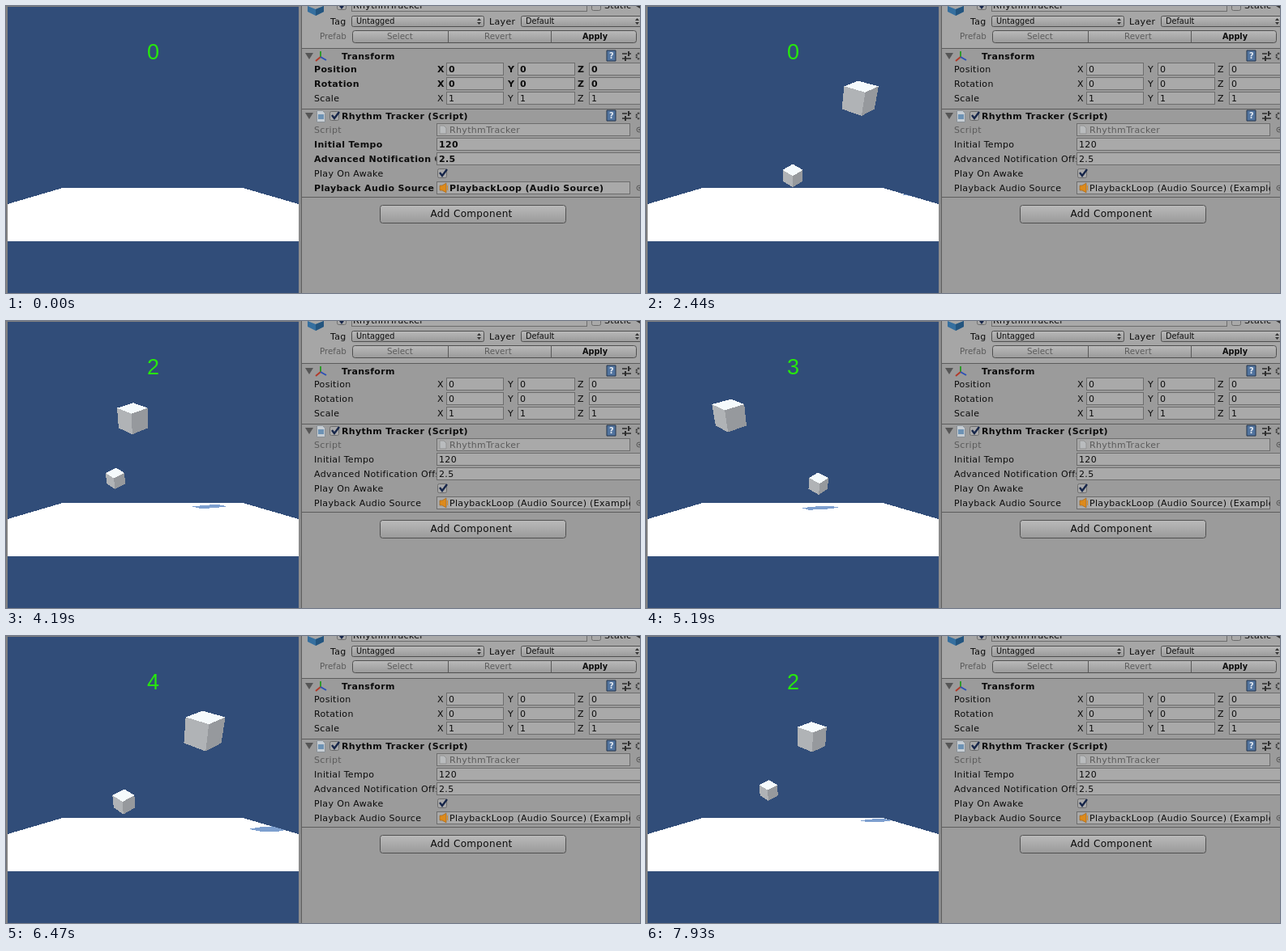
An HTML page that plays this animation: 782 px wide and 355 px high, repeating every 8 s.

```html
<!DOCTYPE html>
<html lang="en">
<head>
<meta charset="utf-8">
<title>Rhythm Tracker</title>
<style>
html, body { margin: 0; width: 100%; height: 100%; overflow: hidden; background: #9b9b9b; }
svg { display: block; width: 782px; height: 355px; }
text { font: 11px "DejaVu Sans", sans-serif; letter-spacing: .34px; fill: #0c0c0c; white-space: pre; }
text.b, .edit text.v { font-weight: bold; }
text.s { font-size: 9.7px; letter-spacing: 0; }
text.m { font-size: 10.3px; letter-spacing: 0; }
text.l { font-size: 12px; }
text.dim { fill: #5b5b5b; }
#count { font: 27px "Liberation Sans", Arial, sans-serif; letter-spacing: 0; fill: #27e80c; text-anchor: middle; }
.edit .play, .run .rest { display: none; }
.crisp { shape-rendering: crispEdges; }
.field { fill: #a9a9a9; stroke: #6d6d6d; }
.btn { fill: url(#btn); stroke: #505050; }
</style>
</head>
<body>
<svg id="stage" class="edit" viewBox="0 0 782 355">
  <defs>
    <linearGradient id="btn" x2="0" y2="1">
      <stop offset="0" stop-color="#bababa"/><stop offset="1" stop-color="#9a9a9a"/>
    </linearGradient>
    <clipPath id="view"><rect x="2" y="1" width="359" height="354"/></clipPath>
    <clipPath id="floor"><path d="M2 245L70 225H292L361 245V291H2Z"/></clipPath>
  </defs>
  <rect width="782" height="355" fill="#9b9b9b"/>
  <rect x="365" width="417" height="52" fill="#a6a6a6"/>
  <rect width="365" height="355" fill="#808080"/>
  <rect x="361" width="4" height="355" fill="#8c8c8c"/>
  <path d="M364.5 0V355" stroke="#5e5e5e"/>
  <rect x="2" y="1" width="359" height="354" fill="#314d79"/>
  <path class="crisp" d="M2 245L70 225H292L361 245V291H2Z" fill="#fff"/>
  <g id="shade" class="crisp" clip-path="url(#floor)" fill="#7d9fcf"></g>
  <g id="cubes" class="crisp" clip-path="url(#view)"></g>
  <text id="count" x="181.5" y="66">0</text>
  <g id="panel"></g>
</svg>
<script>
const $ = id => document.getElementById(id);

// ---- Inspector ----
const parts = [];
const add = s => parts.push(s);
const text = (x, y, s, cls = '') => add(`<text x="${x}" y="${y}" class="${cls}">${s}</text>`);
const box = (x, y, w, h, cls = 'field', r = 0) =>
  add(`<rect x="${x + .5}" y="${y + .5}" width="${w}" height="${h}" rx="${r}" class="${cls}"/>`);
const path = (d, fill = 'none', stroke = 'none', w = 1) =>
  add(`<path d="${d}" fill="${fill}" stroke="${stroke}" stroke-width="${w}"/>`);
const rule = y => path(`M365 ${y + .5}H782`, 'none', '#5c5c5c');
const sorter = (x, y) => path(`M${x} ${y - 1}l2.5 -3 2.5 3zM${x} ${y + 1}l2.5 3 2.5 -3z`, '#333');

function check(x, y) {
  box(x, y, 11, 11, 'field', 2);
  path(`M${x + 3} ${y + 5}l3 4 6 -8`, 'none', '#17264a', 2.4);
}

function gear(x, y) {
  add(`<circle cx="${x}" cy="${y}" r="3.5" fill="none" stroke="#333" stroke-width="2" stroke-dasharray="1.8 1"/>`);
}

function header(y, title) {
  path(`M369 ${y - 4}h10l-5 8z`, '#565656');
  text(414, y + 4, title, 'b');
  path(`M741 ${y - 7}h11v13h-11z`, '#52749f', '#22354f');
  add(`<text x="744" y="${y + 3}" class="s b" style="fill:#e4e9f0">?</text>`);
  path(`M760 ${y - 3}h6M768 ${y - 3}h3M760 ${y + 3}h3M765 ${y + 3}h6`, 'none', '#2e2e2e', 1.5);
  path(`M768 ${y - 6}v6M764 ${y}v6`, 'none', '#2e2e2e', 2);
  gear(781, y);
}

// object header
path('M372 0L382 4 392 0V7L382 12 372 7Z', '#356f9f');
path('M382 4L392 0V7L382 12Z', '#24557f');
check(408, -7);
box(426, -9, 290, 15);
text(428, 3, 'RhythmTracker');
box(722, -6, 11, 11, 'field', 2);
text(738, 3, 'Static');
path('M777 0h5v3z', '#333');
text(400, 23, 'Tag');
box(426, 12, 163, 13, 'btn', 2);
text(432, 22, 'Untagged', 's');
sorter(581, 19);
text(596, 23, 'Layer');
box(635, 12, 160, 13, 'btn', 2);
text(641, 22, 'Default', 's');
sorter(776, 19);
text(387, 41, 'Prefab', 'm dim');
box(427, 30, 350, 15, 'btn', 3);
path('M545.5 30V46M672.5 30V46', 'none', '#595959');
text(470, 41, 'Select', 'm dim');
text(590, 41, 'Revert', 'm dim');
text(711, 41, 'Apply', 's b');
rule(52);

// transform
header(62, 'Transform');
path('M388 63V56', 'none', '#2f9a2b', 2);
path('M388 63L382 68', 'none', '#b23a2a', 2);
path('M388 63L395 67', 'none', '#2c50b5', 2);
[['Position', 0, 'v'], ['Rotation', 0, 'v'], ['Scale', 1, '']].forEach(([name, val, cls], i) => {
  const y = 82 + 18 * i;
  text(380, y, name, cls);
  [['X', 532, 543], ['Y', 619, 631], ['Z', 705, 719]].forEach(([axis, x, fx]) => {
    text(x, y, axis, cls);
    box(fx, y - 12, 70, 15);
    text(fx + 3, y, val, cls);
  });
});
rule(127);

// script
header(136, 'Rhythm Tracker (Script)');
path('M383.5 129.5h7l3 3v11h-10z', '#c6cdd3', '#8a9096');
path('M385 134h7v6h-7z', '#6d92b4');
check(399, 130);
text(380, 157, 'Script', 'dim');
box(531, 145, 238, 15);
path('M535 148h5l3 3v7h-8z', '#b9bcbe', '#939393');
text(547, 157, 'RhythmTracker', 'dim');
[['Initial Tempo', '120', 175], ['Advanced Notification Offset', '2.5', 193]].forEach(([name, val, y]) => {
  text(380, y, name, 'v');
  path(`M530.5 ${y - 14}H782V${y + 5}H530.5Z`, '#9b9b9b');
  box(531, y - 12, 260, 15);
  text(534, y, val, 'v');
});
text(380, 211, 'Play On Awake');
check(532, 201);
text(380, 229, 'Playback Audio Source', 'v');
box(531, 217, 238, 15);
path('M535 222h3l5 -3v12l-5 -3h-3z', '#dd8a1c', '#99601a', .6);
path('M544.5 222v6', 'none', '#dd8a1c');
text(547, 229, 'PlaybackLoop (Audio Source)', 'v rest');
text(547, 229, 'PlaybackLoop (Audio Source) (Example)', 'play');
path('M770 216H782V234H770Z', '#9b9b9b');
for (const y of [153, 225]) {
  add(`<circle cx="781" cy="${y}" r="3" fill="none" stroke="#555"/><circle cx="781" cy="${y}" r="1" fill="#555"/>`);
}
rule(236);
box(461, 246, 229, 22, 'btn', 3);
text(523.5, 261, 'Add Component', 'l');
$('panel').innerHTML = parts.join('');

// ---- Scene ----
const LOOP = 8000, FOCAL = 332, CX = 181, CY = 192, FLOOR = 1.3, HALF = .345, LIFE = 2.12;
const LANES = [3, 0, -1, -3, 2, -2, 1, -2];
// [ms, beat]
const TEMPO = [[800, 0], [2440, 1.43], [3210, 2.17], [4190, 3.25], [5190, 4.34], [6470, 5.62], [7930, 7.17], [8000, 7.245]];

function beatAt(t) {
  if (t < TEMPO[0][0]) return -1;
  const i = TEMPO.findIndex(p => p[0] > t);
  const [t0, b0] = TEMPO[i - 1], [t1, b1] = TEMPO[i];
  return b0 + (b1 - b0) * (t - t0) / (t1 - t0);
}

// drop, bounce on the far edge, hover, then plunge (y points down)
const BOUNCE = .45, TOP = 1.22;
function heightAt(a) {
  if (a < BOUNCE) return -.19 + 4.8 * a * a;
  if (a < TOP) return -.56 + 1.34 * Math.cos(Math.PI * (a - BOUNCE) / (TOP - BOUNCE));
  return -1.9 + 5.5 * (a - TOP) ** 3;
}

const YAW = Math.PI / 4, PITCH = .6;
function turn([x, y, z]) {
  const c = Math.cos(YAW), s = Math.sin(YAW), p = Math.cos(PITCH), q = Math.sin(PITCH);
  const u = x * c - z * s, w = x * s + z * c;
  return [u, y * p - w * q, y * q + w * p];
}

const QUAD = [[-1, -1], [1, -1], [1, 1], [-1, 1]];
const FACES = [];
for (let axis = 0; axis < 3; axis++) {
  for (const side of [-1, 1]) {
    const normal = [0, 0, 0];
    normal[axis] = side;
    const pts = QUAD.map(([a, b]) => {
      const p = [0, 0, 0];
      p[axis] = side * HALF;
      p[(axis + 1) % 3] = a * HALF;
      p[(axis + 2) % 3] = b * HALF;
      return turn(p);
    });
    const n = turn(normal);
    const fill = axis === 1 ? (side < 0 ? '#f5fafc' : '#6f747b') : n[0] < 0 ? '#b0b3b6' : '#96999d';
    FACES.push({ n, pts, fill });
  }
}

const project = ([x, y, z]) => `${(CX + FOCAL * x / z).toFixed(2)},${(CY + FOCAL * y / z).toFixed(2)}`;
const poly = (pts, attr = '') => `<polygon points="${pts.map(project).join(' ')}"${attr}/>`;

function castShadow([x, y, z]) {
  const h = FLOOR - y;
  return [x + .97 * h, FLOOR, z + .86 * h];
}

function drawScene(beat) {
  let cubes = '', shade = '';
  for (let i = LANES.length - 1; i >= 0; i--) {
    const age = beat - i;
    if (age < 0 || age >= LIFE) continue;
    const c = [LANES[i] * .65, heightAt(age), FOCAL * (.0465 - .016 * age)];
    const overFloor = age > .7 && c[1] < FLOOR - .5;
    for (const f of FACES) {
      const pts = f.pts.map(p => p.map((v, k) => v + c[k]));
      const facing = f.n.reduce((sum, v, k) => sum + v * pts[0][k], 0);
      if (facing < 0) cubes += poly(pts, ` fill="${f.fill}"`);
      if (overFloor) shade += poly(pts.map(castShadow));
    }
  }
  $('cubes').innerHTML = cubes;
  $('shade').innerHTML = shade;
}

function render(t) {
  const beat = beatAt(t);
  $('stage').setAttribute('class', t < 500 ? 'edit' : 'run');
  $('count').textContent = beat < 2 ? 0 : (Math.floor(beat) - 2) % 4 + 1;
  drawScene(beat);
}

const start = performance.now();
function frame() {
  render((performance.now() - start) % LOOP);
  requestAnimationFrame(frame);
}
frame();
</script>
</body>
</html>
```
